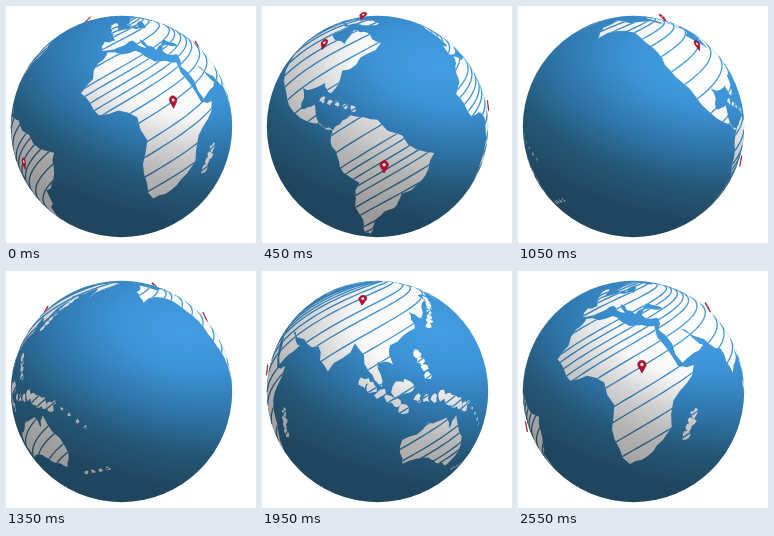
Animation, 250 px wide and 237 px high, one loop 2700 ms. Source, as an HTML page:

```html
<!DOCTYPE html>
<html lang="en">
<head>
<meta charset="utf-8">
<title>Rotating globe</title>
<style>
  html, body { margin: 0; width: 100%; height: 100%; overflow: hidden; background: #fff; }
  svg { display: block; width: 100vw; height: 100vh; }
</style>
</head>
<body>
<svg viewBox="0 0 250 237">
  <defs>
    <radialGradient id="sea" gradientUnits="userSpaceOnUse" cx="0" cy="0" r="160"
        gradientTransform="translate(175 60) rotate(12) scale(1.7 1)">
      <stop offset="0" stop-color="#449fe4"/>
      <stop offset=".25" stop-color="#3c92d4"/>
      <stop offset=".5" stop-color="#2f76ab"/>
      <stop offset=".75" stop-color="#245675"/>
      <stop offset="1" stop-color="#20455e"/>
    </radialGradient>
    <radialGradient id="ground" href="#sea">
      <stop offset="0" stop-color="#fff"/>
      <stop offset=".3" stop-color="#f8f8f8"/>
      <stop offset=".5" stop-color="#d2d2d2"/>
      <stop offset=".7" stop-color="#b4b4b4"/>
      <stop offset="1" stop-color="#9a9a9a"/>
    </radialGradient>
    <clipPath id="disc"><circle cx="115.5" cy="120.5" r="110.7"/></clipPath>
    <clipPath id="coast"><path id="coastPath"/></clipPath>
  </defs>
  <g id="pinsBack"></g>
  <circle cx="115.5" cy="120.5" r="110.7" fill="url(#sea)"/>
  <g clip-path="url(#disc)">
    <path id="land" fill="url(#ground)"/>
    <path id="stripes" clip-path="url(#coast)" fill="none" stroke="url(#sea)" stroke-width="1.3"/>
  </g>
  <g id="pinsFront"></g>
</svg>
<script>
const CX = 115.5, CY = 120.5, R = 110.7;
const EYE = 6;                                // eye distance in globe radii
const SCALE = R * Math.sqrt(EYE * EYE - 1);
const STEP_MS = 150, STEPS = 18, START_LON = 2;
const RAD = Math.PI / 180;
const $ = id => document.getElementById(id);

let seed = 7;
const random = () => (seed = seed * 16807 % 2147483647) / 2147483647;
const mix = (a, b, t) => a + (b - a) * t;

// Key corners "lon,lat" of each continent; roughen() adds the small bays
const continents = {
  eurasia: `-9,37 -9,43 -2,44 -4,48 8,54 11,57 12,54 22,55 24,59 24,65 18,61 16,56 7,58 14,68
    26,71 44,67 75,73 105,77 140,72 180,68 163,58 157,51 158,61 137,54 140,50 128,36 121,40
    122,30 108,21 109,12 102,13 104,2 98,9 91,22 79,9 72,21 57,26 48,30 55,24 59,22 45,13
    35,29 36,36 27,37 28,41 41,42 32,46 23,38 14,45 17,39 9,44 0,39`,
  africa: `-6,36 10,37 20,31 33,31 43,11 51,12 40,-4 40,-16 32,-28 20,-35 12,-17 9,4 -8,5
    -17,15 -10,30`,
  northAmerica: `-165,56 -157,65 -125,63 -95,62 -85,58 -94,50 -79,42 -77,53 -65,50 -56,42
    -64,35 -76,26 -80,15 -84,20 -97,18 -96,8 -88,10 -83,0 -77,-2 -85,1 -105,10 -117,23
    -124,36 -137,50 -163,46`,
  southAmerica: `-77,0 -70,5 -58,3 -47,-4 -31,-12 -36,-26 -45,-32 -48,-41 -58,-48 -62,-60
    -66,-67 -72,-64 -70,-45 -67,-26 -76,-18 -79,-9`,
  australia: `114,-22 126,-14 136,-12 139,-17 142,-11 152,-26 148,-38 139,-36 131,-32 116,-35`
};

// Island groups: from lon,lat to lon,lat, number of islands, size in degrees
const chains = [
  [96, 4, 114, -8, 6, 2.2],      // Sumatra, Java
  [112, 1, 116, 2, 2, 4],        // Borneo
  [120, -3, 128, -3, 3, 1.8],    // Sulawesi
  [121, 17, 125, 7, 4, 1.8],     // Philippines
  [131, 32, 143, 52, 8, 1.7],    // Japan
  [133, -2, 147, -7, 5, 2.7],    // New Guinea
  [150, -5, 165, -16, 5, .9],    // Solomons
  [160, -41, 174, -38, 4, 1.2],  // New Zealand
  [51, -10, 48, -20, 4, 2.2],    // Madagascar
  [-3, 51, -4, 58, 3, 1.9],      // Britain
  [-84, 12, -69, 8, 5, 1.4],     // Antilles
  [-110, 68, -65, 60, 6, 3.5]    // Arctic
];

const parse = text => text.trim().split(/\s+/).map(pair => pair.split(',').map(Number));

// Midpoint displacement
function roughen(points, rounds) {
  if (!rounds) return points;
  return roughen(points.flatMap(([x, y], i) => {
    const [nx, ny] = points[(i + 1) % points.length];
    const bend = (random() - .5) * .3;
    return [[x, y], [(x + nx) / 2 + bend * (ny - y), (y + ny) / 2 - bend * (nx - x)]];
  }), rounds - 1);
}

function islands([lon0, lat0, lon1, lat1, count, size]) {
  return Array.from({ length: count }, (_, i) => {
    const t = i / (count - 1), lat = mix(lat0, lat1, t), lon = mix(lon0, lon1, t);
    return Array.from({ length: 9 }, (_, k) => {
      const a = -k * 40 * RAD, r = size * (.55 + .8 * random());
      return [lon + r * Math.cos(a) / Math.cos(lat * RAD), lat + r * Math.sin(a)];
    });
  });
}

const lands = [
  ...Object.values(continents).map(text => roughen(parse(text), 2)),
  ...chains.flatMap(islands)
];

// Diagonal hatching over all land, unevenly spaced
const HATCH_SLOPE = .6;
const hatchStarts = [];
for (let lat = -290; lat < 80; lat += 4 + 7 * random()) hatchStarts.push(lat);

const pins = [[25.7, 11], [-55, -17.5], [-93.4, 41.8], [92, 47], [-82, 72]];

function toSphere(lon, lat, centre) {
  const a = (lon - centre) * RAD, b = lat * RAD;
  return [Math.cos(b) * Math.sin(a), Math.sin(b), Math.cos(b) * Math.cos(a)];
}

function project([x, y, z]) {
  const k = SCALE / (EYE - z);
  return [CX + x * k, CY - y * k];
}

const inSight = p => p[2] > 1 / EYE;
const point = p => p.map(v => v.toFixed(2)).join(' ');
const closed = points => 'M' + points.map(point).join('L') + 'Z';

// Hidden corners move radially to just outside the rim
function projectCoast(p) {
  if (inSight(p)) return project(p);
  const k = R * 1.2 / (Math.hypot(p[0], p[1]) || 1);
  return [CX + p[0] * k, CY - p[1] * k];
}

function landPath(centre) {
  return lands.map(corners => {
    const points = corners.map(([lon, lat]) => toSphere(lon, lat, centre));
    return points.some(inSight) ? closed(points.map(projectCoast)) : '';
  }).join('');
}

function stripePath(centre) {
  let d = '';
  for (const start of hatchStarts) {
    let drawing = false;
    for (let lon = -180; lon <= 180; lon += 3) {
      const lat = start + HATCH_SLOPE * (lon + 180);
      const p = toSphere(lon, lat, centre);
      const shown = Math.abs(lat) < 78 && inSight(p);
      if (shown) d += (drawing ? 'L' : 'M') + point(project(p));
      drawing = shown;
    }
  }
  return d;
}

function arc(radius, from, to) {
  return Array.from({ length: 17 }, (_, i) => {
    const a = mix(from, to, i / 16) * RAD;
    return [radius * Math.cos(a), .012 + radius * Math.sin(a)];
  });
}
const pinBody = [...arc(.032, -28, 208), [0, -.053]];
const pinHole = arc(.013, 0, 360);

// Pins hover above the surface, leaning back less than the ground does
function pinMarkup(lon, lat, centre) {
  const base = toSphere(lon, lat, centre);
  const east = toSphere(lon + 90, 0, centre);
  const up = toSphere(lon, lat * .6 + 90, centre);
  const lay = outline => closed(outline.map(([e, n]) =>
    project(base.map((v, i) => v * 1.018 + east[i] * e + up[i] * n))));
  return `<path d="${lay(pinBody)}" fill="#b4112f" stroke="#8e1029" stroke-width=".7"/>` +
    `<path d="${lay(pinHole)}" fill="#f3e4e7"/>`;
}

function draw(step) {
  const centre = START_LON - step * 360 / STEPS;
  const coast = landPath(centre);
  $('land').setAttribute('d', coast);
  $('coastPath').setAttribute('d', coast);
  $('stripes').setAttribute('d', stripePath(centre));
  let front = '', back = '';
  for (const [lon, lat] of pins) {
    const depth = toSphere(lon, lat, centre)[2];
    if (depth > 1 / EYE) front += pinMarkup(lon, lat, centre);
    else if (depth > -.06) back += pinMarkup(lon, lat, centre);
  }
  $('pinsFront').innerHTML = front;
  $('pinsBack').innerHTML = back;
}

let shownStep = -1;
const began = performance.now();
function tick() {
  const step = Math.floor((performance.now() - began) / STEP_MS) % STEPS;
  if (step !== shownStep) draw(shownStep = step);
  requestAnimationFrame(tick);
}
tick();
</script>
</body>
</html>
```
